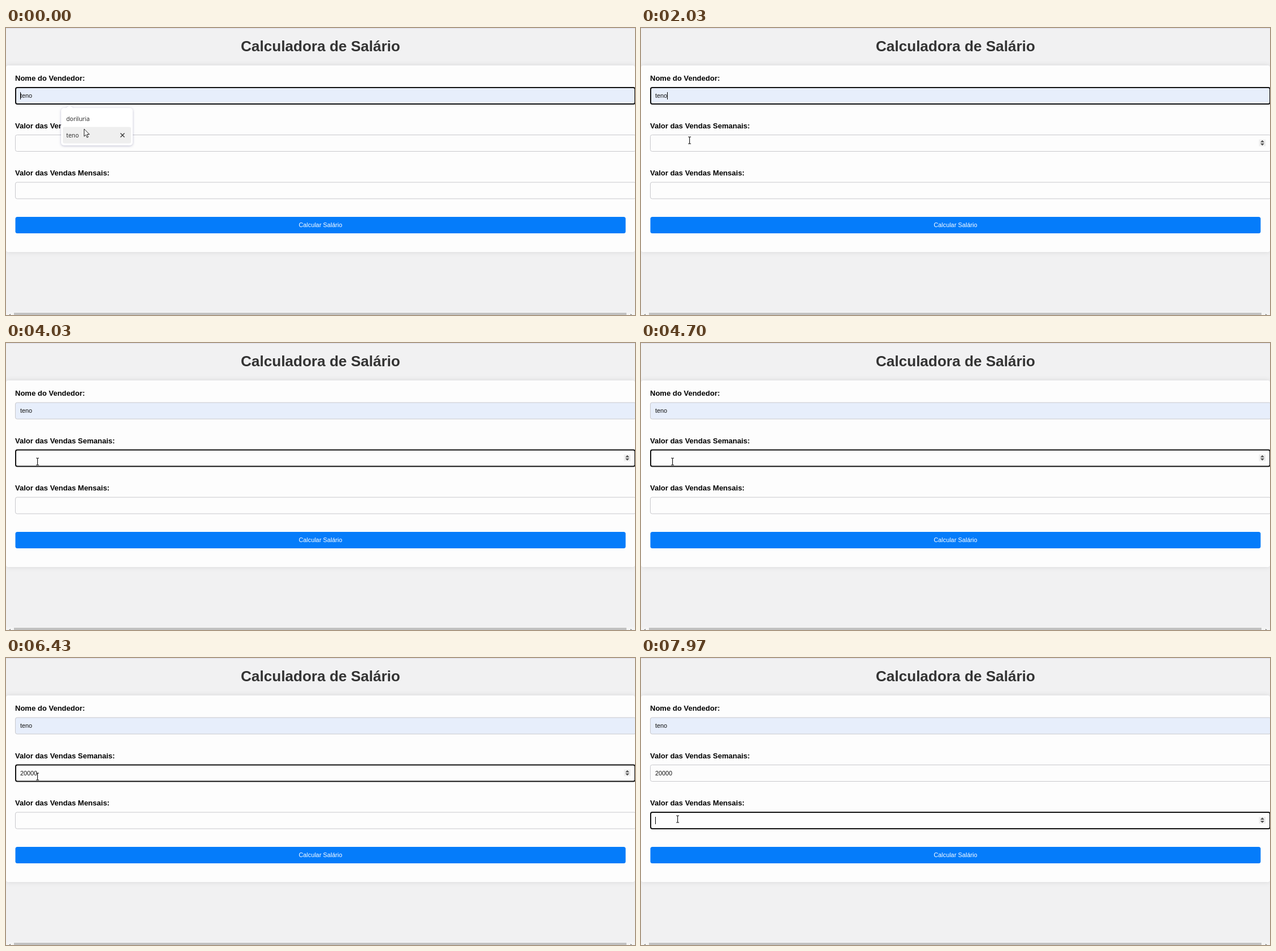
An HTML page for the animation above (8 s loop, 1107 px wide and 506 px high).

```html
<!DOCTYPE html>
<html lang="pt">
<head>
<meta charset="utf-8">
<title>Calculadora de Salário</title>
<style>
  html, body { margin: 0; width: 100%; height: 100%; overflow: hidden; background: #f1f1f2; }
  svg { display: block; font: 10.83px "Liberation Sans", Arial, sans-serif; cursor: none; }
  .label { font-weight: bold; font-size: 13px; }
  .card { filter: drop-shadow(0 0 4px #0000001c); }
  .menu { font: 10.4px "Open Sans", "Noto Sans", sans-serif; fill: #222; }
  .popup { filter: drop-shadow(0 1px 2px #00005040); }
</style>
</head>
<body>
<svg width="1107" height="506" viewBox="0 0 1107 506">
  <rect width="1107" height="506" fill="#f1f1f2"/>
  <rect width="1107" height="1" fill="#dcdce8"/>
  <text x="553.5" y="41" font-size="26" font-weight="bold" fill="#333" text-anchor="middle">Calculadora de Salário</text>
  <rect class="card" y="66" width="1107" height="329" rx="4" fill="#fdfdfd"/>
  <g id="fields"></g>
  <rect x="16.5" y="333" width="1074" height="29" rx="3.5" fill="#057cfa"/>
  <text x="553.5" y="351" fill="#fff" text-anchor="middle">Calcular Salário</text>

  <g id="menu" class="menu">
    <g class="popup" fill="#fff">
      <rect x="97" y="141" width="126" height="66" rx="5"/>
      <path d="M106 141l6-5 6 5z"/>
    </g>
    <rect x="100" y="174.500" width="120" height="29" rx="3" fill="#efefef"/>
    <text x="106" y="163.500">doriluria</text>
    <text x="106" y="193">teno</text>
    <path d="M201.500 185.500l7 7m0-7l-7 7" stroke="#333" stroke-width="1.300"/>
  </g>

  <rect y="501" width="1107" height="5" fill="#f4f4f4"/>
  <rect x="14" y="502" width="1078" height="4" fill="#c1c1c1"/>
  <path d="M8 504v2h-3zM1099 504v2h3z" fill="#777"/>

  <path id="arrow" d="M0 0v13l3-2.700 2.200 4.800 2-.900-2.100-4.700h4.200z" fill="#fff" stroke="#222" stroke-width="1"/>
  <path id="beam" d="M-2.500-6H-.700L0-5.400.700-6H2.500M0-5.500V5.500M-2.500 6H-.700L0 5.400.700 6H2.500" fill="none" stroke="#111" stroke-width="1.100"/>
</svg>
<script>
const $ = id => document.getElementById(id);
const show = (el, on) => el.setAttribute("visibility", on ? "visible" : "hidden");

const LOOP = 8000, PICK = 900, FOCUS2 = 3200, FOCUS3 = 7600;
const keys = [[4800, "2"], [5050, "0"], [5280, "0"], [5500, "0"], [5700, "0"]];
// time, x, y of the pointer
const path = [[0, 137, 178], [730, 128, 190], [1050, 128, 190], [1900, 85, 198],
  [2200, 85, 198], [3000, 55, 209], [6750, 55, 209], [7400, 64, 284], [LOOP, 64, 284]];

const fields = [
  ["Nome do Vendedor:", 105, "#e7eefb"],
  ["Valor das Vendas Semanais:", 188.5, "#fdfdfd"],
  ["Valor das Vendas Mensais:", 272, "#fdfdfd"]
].map(([label, y, fill]) => {
  const g = document.createElementNS("http://www.w3.org/2000/svg", "g");
  g.innerHTML = `
    <text class="label" x="16" y="${y - 12}">${label}</text>
    <rect x="16.5" y="${y}" width="1092" height="29" rx="3" fill="${fill}" stroke="#c8c8cc"/>
    <rect x="17" y="${y}" width="1090" height="29" rx="3" fill="none" stroke="#101010" stroke-width="2"/>
    <text x="25" y="${y + 18.3}" fill="#111"></text>
    <rect y="${Math.round(y) + 8}" width="1" height="13" fill="#000"/>
    <g transform="translate(1093.5 ${y + 14})">
      <rect x="-6" y="-6" width="12" height="12" fill="#efefef"/>
      <path d="M-3.500-1L0-4.700 3.500-1zM-3.500 1L0 4.700 3.500 1z" fill="#505050"/>
    </g>`;
  $("fields").append(g);
  const [, , ring, text, caret, spin] = g.children;
  return { y, ring, text, caret, spin };
});

function pointer(t) {
  const i = path.findIndex(p => p[0] > t);
  const [t0, x0, y0] = path[i - 1], [t1, x1, y1] = path[i];
  const u = (t - t0) / (t1 - t0), k = u * u * (3 - 2 * u);
  return [x0 + (x1 - x0) * k, y0 + (y1 - y0) * k];
}

function draw(t) {
  const [x, y] = pointer(t);
  const open = t < PICK;
  const typed = keys.filter(k => k[0] <= t);
  const active = t < FOCUS2 ? 0 : t < FOCUS3 ? 1 : 2;
  const lastKey = typed.length ? typed[typed.length - 1][0] : FOCUS2;
  const blinkStart = [open ? -300 : PICK, lastKey, FOCUS3][active];
  const blinkOn = (t - blinkStart) % 1000 < 500;
  const values = ["teno", typed.map(k => k[1]).join(""), ""];
  let overField = false;

  fields.forEach((f, i) => {
    const hover = !open && y >= f.y && y <= f.y + 29;
    overField ||= hover;
    f.text.textContent = values[i];
    show(f.ring, i === active);
    show(f.caret, i === active && blinkOn);
    show(f.spin, i > 0 && (i === active || hover));
    const width = open || !values[i] ? 0 : f.text.getComputedTextLength();
    f.caret.setAttribute("x", Math.round(25 + width));
  });

  show($("menu"), open);
  for (const id of ["arrow", "beam"]) {
    $(id).setAttribute("transform", `translate(${Math.round(x) + .5} ${Math.round(y)})`);
    show($(id), (id === "beam") === overField);
  }
}

const start = performance.now();
function tick() {
  draw((performance.now() - start) % LOOP);
  requestAnimationFrame(tick);
}
tick();
</script>
</body>
</html>
```
